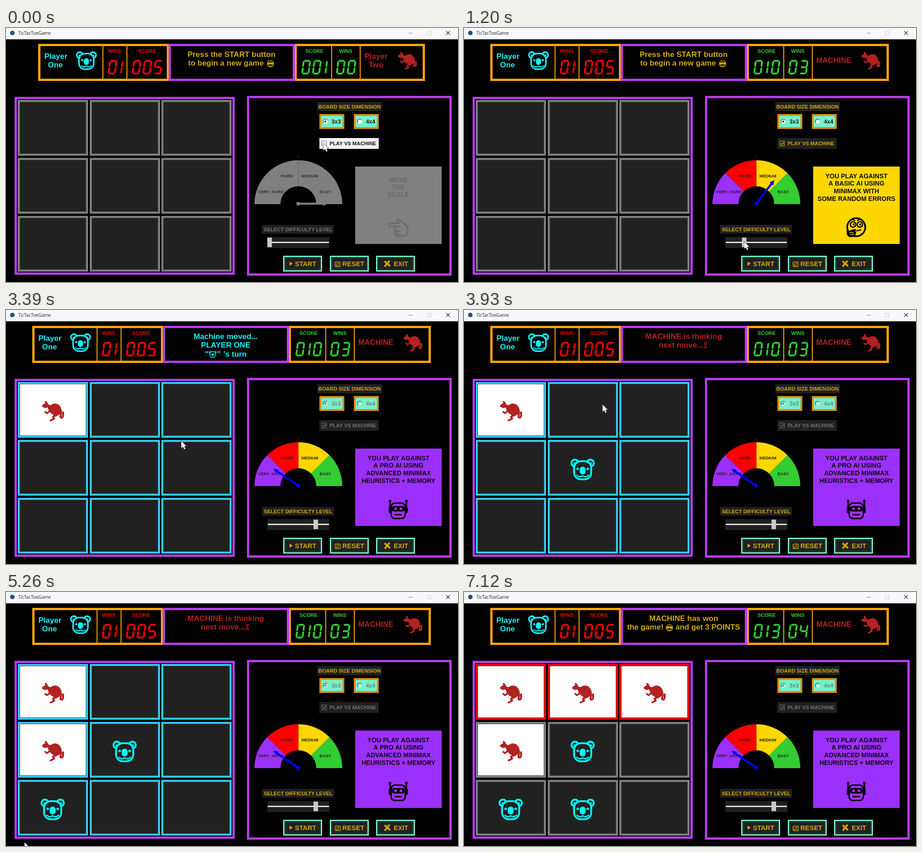
Animation of 998 by 561 pixels, one loop 7.19 s. Source, as an HTML page with a canvas:

```html
<!DOCTYPE html>
<html lang="en">
<head>
<meta charset="utf-8">
<title>TicTacToeGame</title>
<style>
  html, body { margin: 0; width: 100%; height: 100%; overflow: hidden; background: #000; }
  canvas { display: block; }
</style>
</head>
<body>
<canvas id="stage" width="998" height="561"></canvas>
<script>
const ctx = document.getElementById('stage').getContext('2d');
const LOOP = 7190;
const GOLD = '#cfa90f', DARK = '#212121', GRAY = '#808080', PURPLE = '#b93cf5', ORANGE = '#ffa500';
const CYAN = '#12f2fa', BRICK = '#b22222', LIME = '#32cd32', MINT = '#78efc8';

// time, x, y of the pointer
const POINTER = [
  [0, 701, 255], [130, 701, 255], [530, 583, 472], [590, 583, 472], [725, 597, 473],
  [855, 606, 473], [990, 608, 473], [1195, 618.5, 472], [1660, 645, 467], [2190, 676, 444],
  [2390, 684, 443], [2590, 684, 443], [2655, 672, 485], [2725, 657, 518], [3125, 657, 518],
  [3391, 388, 289], [3458, 272, 348], [3725, 272, 348], [3920, 306, 209], [4454, 306, 209],
  [4455, 62, 500], [5055, 62, 500], [5250, 41, 553], [6114, 41, 553],
  [6115, 255, 500], [6310, 255, 575], [LOOP, 255, 575]
];
// time, column, row, piece
const MOVES = [
  [3260, 0, 0, 'roo'], [3730, 1, 1, 'koala'], [4460, 0, 1, 'roo'], [5060, 0, 2, 'koala'],
  [5720, 2, 0, 'roo'], [6120, 1, 2, 'koala'], [6850, 1, 0, 'roo']
];
const LEVELS = [
  ['EASY', LIME, 705, 362, ['YOU PLAY AGAINST', 'A SIMPLE AI USING', 'RANDOM MOVES', 'WITHOUT STRATEGY']],
  ['MEDIUM', '#ffd700', 671, 327, ['YOU PLAY AGAINST', 'A BASIC AI USING', 'MINIMAX WITH', 'SOME RANDOM ERRORS']],
  ['HARD', '#ff0000', 620, 327, ['YOU PLAY AGAINST', 'A LOGICAL AI USING', 'MINIMAX + PRUNING', 'NO HEURISTIC BOOSTS']],
  ['VERY_HARD', '#9b30ff', 585, 362, ['YOU PLAY AGAINST', 'A PRO AI USING', 'ADVANCED MINIMAX', 'HEURISTICS + MEMORY']]
];

function rect(x, y, w, h, color) { ctx.fillStyle = color; ctx.fillRect(x, y, w, h); }
function frame(x, y, w, h, border, color, fill = '#000') {
  rect(x, y, w, h, color);
  rect(x + border, y + border, w - 2 * border, h - 2 * border, fill);
}
function text(s, x, y, size, color, align = 'center') {
  ctx.font = `bold ${size}px "Liberation Sans", Arial, sans-serif`;
  ctx.textAlign = align;
  ctx.fillStyle = color;
  ctx.fillText(s, x, y + size * 0.36);
}
function at(x, y, scale, draw) {
  ctx.save();
  ctx.translate(x, y);
  ctx.scale(scale, scale);
  ctx.lineCap = ctx.lineJoin = 'round';
  draw();
  ctx.restore();
}
function dot(x, y, r, color) {
  ctx.fillStyle = color;
  ctx.beginPath(); ctx.arc(x, y, r, 0, 7); ctx.fill();
}
function ring(x, y, r, width, color) {
  ctx.strokeStyle = color; ctx.lineWidth = width;
  ctx.beginPath(); ctx.arc(x, y, r, 0, 7); ctx.stroke();
}
function pill(x, y, w, h, r, color) {
  ctx.fillStyle = color;
  ctx.beginPath(); ctx.roundRect(x, y, w, h, r); ctx.fill();
}
function line(d, width, color) {
  ctx.strokeStyle = color; ctx.lineWidth = width;
  ctx.stroke(new Path2D(d));
}
function shape(d, color) { ctx.fillStyle = color; ctx.fill(new Path2D(d)); }

function koala(x, y, scale, bg, color = '#00f5ff') {
  at(x, y, scale, () => {
    for (const s of [-1, 1]) { dot(17 * s, -14, 9.7, color); dot(17 * s, -14, 5.6, bg); }
    pill(-21, -20, 42, 44, 17, color);
    pill(-17, -16, 34, 36, 13, bg);
    for (const s of [-1, 1]) { dot(18 * s, -13, 2.5, color); dot(11 * s, -1, 2.8, color); }
    pill(-6.5, -6, 13, 17, 6, color);
    line('M-13 13Q-7 19 0 14Q7 19 13 13', 2.6, color);
  });
}
function roo(x, y, scale) {
  at(x, y, scale, () => {
    shape('M-24.5-11Q-21-16-17-17L-18-22Q-13-23-11-16Q-8-11-3-14C5-20 17-15 19-3Q19 5 13 9' +
      'L5 13L0 8Q-6 5-9-1L-12-8Q-18-4-24.5-11Z', BRICK);
    line('M17-2C21 8 13 14 19 14.5Q23.5 15 22.5 3', 4.2, BRICK);
    line('M-7 0L-13 5L-17 2', 3.6, BRICK);
    line('M8 8L0 13L3 17L-5 21', 4, BRICK);
  });
}
function coolFace(x, y, color) {
  at(x, y, 1, () => {
    ring(0, 0, 7, 1.6, color);
    shape('M-7-2Q0-5 7-2Q6 3 2 2L0 0L-2 2Q-6 3-7-2Z', color);
    line('M-3 4Q0 6 3 4', 1.3, color);
  });
}

const SEGMENTS = { 0: 'abcdef', 1: 'bc', 3: 'abcdg', 4: 'bcfg', 5: 'acdfg' };
const BARS = {
  a: [2, 2, 16, 2], b: [16, 2, 16, 16], c: [16, 16, 16, 30], d: [2, 30, 16, 30],
  e: [2, 16, 2, 30], f: [2, 2, 2, 16], g: [2, 16, 16, 16]
};
function led(digits, x, color) {
  ctx.fillStyle = color;
  for (const d of digits) {
    ctx.save();
    ctx.transform(1, 0, -0.13, 1, x + 4.2 - (d === '1' ? 10 : 0), 70.5);
    for (const key of SEGMENTS[d]) {
      const [x1, y1, x2, y2] = BARS[key];
      const ux = Math.sign(x2 - x1), uy = Math.sign(y2 - y1), h = 2;
      const p = (px, py, along, side) => ctx.lineTo(px + ux * along - uy * side, py + uy * along + ux * side);
      ctx.beginPath();
      p(x1, y1, .3, 0); p(x1, y1, 2, h); p(x2, y2, -2, h);
      p(x2, y2, -.3, 0); p(x2, y2, -2, -h); p(x1, y1, 2, -h);
      ctx.fill();
    }
    ctx.restore();
    x += d === '1' ? 14.5 : 23.7;
  }
}

function titleBar() {
  rect(0, 0, 998, 25, '#f7f8fc');
  dot(14, 11, 5, '#24507c');
  ctx.font = '10px "Open Sans", sans-serif';
  ctx.textAlign = 'left';
  ctx.fillStyle = '#222';
  ctx.fillText('TicTacToeGame', 27, 15);
  rect(889, 11, 9, 1, '#777');
  ctx.strokeStyle = '#ccc'; ctx.lineWidth = 1;
  ctx.strokeRect(930.5, 7.5, 8, 8);
  line('M972 7L980 15M980 7L972 15', 1.1, '#222');
}

function message(t) {
  const x = t < 70 ? 498 : 485;
  if (t < 3130) {
    text('Press the START button', x, 57.5, 17, GOLD);
    text('to begin a new game', x - 96, 77, 17, GOLD, 'left');
    coolFace(x + 86, 79, GOLD);
  } else if (t >= 6850) {
    text('MACHINE has won', x, 57.5, 17, GOLD);
    text('the game!', 360, 77, 17, GOLD, 'left');
    coolFace(453.5, 79, GOLD);
    text('and get 3 POINTS', 467, 77, 17, GOLD, 'left');
  } else {
    const last = MOVES.filter(m => m[0] <= t).pop();
    if (last && last[3] === 'roo') {
      text('Machine moved...', x, 57.5, 17, CYAN);
      text('PLAYER ONE', x, 77, 17, CYAN);
      text('"', 439, 96.5, 17, CYAN, 'left');
      koala(456.5, 98, 0.32, '#000', CYAN);
      text('"', 466, 96.5, 17, CYAN, 'left');
      text("'s turn", 480, 96.5, 17, CYAN, 'left');
    } else {
      text('MACHINE is thinking', x, 57.5, 17, BRICK);
      text('next move...', 430, 77, 17, BRICK, 'left');
      line('M529.5 72H536.5M529.5 83H536.5M530.5 72Q531 76 533 77.5Q535 76 535.5 72M530.5 83Q531 79 533 77.5Q535 79 535.5 83', 1.3, BRICK);
    }
  }
}

function header(t) {
  const versus = t >= 70, dx = versus ? 0 : 13, won = t >= 6850;
  frame(58 + dx, 35, 289, 82, 5, ORANGE);
  frame(624 + dx, 35, versus ? 314 : 288, 82, 5, ORANGE);
  frame(346 + dx, 35, 279, 82, 5, PURPLE);
  for (const x of [200, 253, 705, 768]) rect(x + dx, 40, 2, 72, ORANGE);
  text('Player', 97 + dx, 61.5, 17, CYAN);
  text('One', 96 + dx, 81, 17, CYAN);
  koala(164.5 + dx, 72, 0.86, '#000', CYAN);
  text('WINS', 227 + dx, 51, 11.4, '#f00000');
  text('SCORE', 298.5 + dx, 51, 11.2, '#f00000');
  led('01', 211 + dx, '#ff0000');
  led('005', 264 + dx, '#ff0000');
  text('SCORE', 668 + dx, 51, 11.2, LIME);
  text('WINS', 737 + dx, 51, 11.4, LIME);
  led(won ? '013' : versus ? '010' : '001', 638.5 + dx, LIME);
  led(won ? '04' : versus ? '03' : '00', 715 + dx, LIME);
  if (versus) text('MACHINE', 816.5, 71, 16.6, BRICK);
  else { text('Player', 817, 61.5, 17, BRICK); text('Two', 817, 81, 17, BRICK); }
  roo(versus ? 898 : 886, 72, 0.86);
  message(t);
}

function board(t) {
  frame(19, 152, 486, 393, 5, PURPLE);
  const won = t >= 6850, taken = MOVES.filter(m => m[0] <= t);
  for (let row = 0; row < 3; row++) for (let col = 0; col < 3; col++) {
    const x = Math.round(26 + col * 158.6), y = 159 + row * 128;
    const move = taken.find(m => m[1] === col && m[2] === row), piece = move && move[3];
    const edge = t < 3130 ? GRAY : !won ? '#35cbf5' : row === 0 ? '#ff0000' : GRAY;
    frame(x, y, 155, 123, 4, edge);
    rect(x + 4, y + 4, 147, 115, '#4a4a4a');
    const bg = piece === 'roo' ? '#fff' : DARK;
    rect(x + 5, y + 5, 145, 113, bg);
    if (piece === 'roo') roo(x + 77.5, y + 64, 1);
    if (piece === 'koala') koala(x + 77, y + 65, 1, bg, '#00ffff');
  }
}

function options(t) {
  const locked = t >= 3130, hover = t < 200;
  rect(687, 164, 143, 20, DARK);
  text('BOARD SIZE DIMENSION', 758.5, 174, 11.35, GOLD);
  [['3x3', 692], ['4x4', 768]].forEach(([label, x], i) => {
    frame(x, 190, 55, 33, 4, '#d68f08', MINT);
    dot(x + 13, 206.5, 5, locked ? '#b8f5e0' : '#fff');
    ctx.strokeStyle = '#333'; ctx.lineWidth = 1.2;
    ctx.beginPath(); ctx.arc(x + 13, 206.5, 5, 2.4, 5.6); ctx.stroke();
    if (!i) dot(x + 13, 206.5, 2, locked ? '#666' : '#111');
    text(label, x + 37, 206.5, 12.2, locked ? '#6d867d' : '#1c1c1c');
  });
  rect(692, 243, 131, 24, hover ? '#f2f2f2' : DARK);
  const color = locked ? '#717171' : hover ? '#111' : GOLD;
  ctx.strokeStyle = hover ? '#777' : color; ctx.lineWidth = 1;
  ctx.strokeRect(697.5, 249.5, 10, 11);
  if (t >= 70) line('M700 255L702 257.5L706 252', 1.8, color);
  text('PLAY VS MACHINE', 766, 255, 11.3, color);
}

function gauge(angle, enabled) {
  LEVELS.forEach(([label, color, x, y], i) => {
    ctx.fillStyle = enabled ? color : GRAY;
    ctx.beginPath();
    ctx.arc(645.5, 389, 97, -i * Math.PI / 4, -(i + 1) * Math.PI / 4, true);
    ctx.arc(645.5, 389, 39.5, -(i + 1) * Math.PI / 4, -i * Math.PI / 4);
    ctx.fill();
  });
  for (const [label, , x, y] of LEVELS) text(label, x, y, 9.2, enabled ? '#29221a' : '#333');
  rect(645, 284, 1, 2, '#888');
  const color = enabled ? '#0000ff' : GRAY;
  ctx.save();
  ctx.translate(645, 388);
  ctx.rotate(-angle);
  dot(0, 0, 4, color);
  rect(0, -2.2, 57, 4.4, color);
  shape('M66 0L54-5.5L57 0L54 5.5Z', color);
  ctx.restore();
}

const ICONS = [
  () => { ring(0, 0, 20, 3.6, '#000'); dot(-7, -5, 3, '#000'); dot(7, -5, 3, '#000'); line('M-10 6Q0 17 10 6', 3, '#000'); },
  bg => {
    ring(0, 0, 20, 3.6, '#000');
    ring(-7, -6, 6, 2.6, '#000'); ring(8, -6, 6, 2.6, '#000');
    dot(-6, -6, 2.2, '#000'); dot(9, -6, 2.2, '#000');
    line('M-13-15Q-8-18-3-15M3-15Q9-19 14-15M1 8L10 6', 2.4, '#000');
    shape('M-21 5Q-18 2-16 8L-4 4Q2 4-2 9Q1 12-1 15Q-2 21-11 22Q-21 22-21 12Z', '#000');
    line('M-15 12H-6M-13 16H-5', 1.3, bg);
  },
  bg => {
    ring(0, 0, 20, 3.6, '#000');
    ring(-8, -3, 4.5, 2.4, '#000'); ring(8, -3, 4.5, 2.4, '#000');
    dot(-8, -3, 1.7, '#000'); dot(8, -3, 1.7, '#000');
    line('M-14-9L-6-13M14-9L6-13', 2.6, '#000');
    shape('M-9 14Q-9 5 0 5Q9 5 9 14Q0 10-9 14Z', '#000');
  },
  bg => {
    line('M-18-5V-17M18-5V-17', 3, '#000');
    dot(-18, -18, 3, '#000'); dot(18, -18, 3, '#000');
    pill(-21, -6, 42, 15, 4, '#000');
    pill(-17, -15, 34, 37, 9, '#000');
    pill(-14, -12, 28, 31, 7, bg);
    pill(-14, -7, 28, 12, 5, '#000');
    pill(-9, -4, 6, 6, 2, bg); pill(3, -4, 6, 6, 2, bg);
    line('M-7 12H7', 3, '#000');
  }
];
function info(level, enabled) {
  const [, color, , , lines] = LEVELS[level];
  const bg = enabled ? color : GRAY;
  rect(771, 306, 191, 171, bg);
  if (enabled) {
    lines.forEach((s, i) => text(s, 866.5, 326.5 + i * 16.7, 14, '#0c0c0c'));
    at(866, 440, 1, () => ICONS[level](bg));
  } else {
    ['MOVE', 'THE', 'SCALE'].forEach((s, i) => text(s, 866, 334.5 + i * 16.7, 14, '#6a6a6a'));
    at(866, 441, 1, () => line('M-18-10H2L-2-15Q0-20 5-16L13-8Q20-6 21 0V9Q19 19 9 19H0Q-6 19-5 14' +
      'Q-9 12-6 8Q-10 5-7 1H-4M-7-3H-18Q-23-6-18-10M-7-3H3M-5 8H4M-4 14H4', 3, '#6a6a6a'));
  }
}

function slider(x, enabled) {
  rect(565, 435, 159, 19, DARK);
  text('SELECT DIFFICULTY LEVEL', 645, 444.5, 11.25, enabled ? GOLD : '#757575');
  rect(577, 462, 137, 24, DARK);
  rect(578, 472, 135, 3, '#dedede');
  rect(x - 5, 463, 10, 21, '#c9c9c9');
}

function buttons(pressed) {
  [['START', 612, 49.5], ['RESET', 715, 52], ['EXIT', 817, 55]].forEach(([label, x, cx], i) => {
    const down = !i && pressed, color = down ? '#000' : GOLD;
    frame(x, 503, 86, 35, 3, MINT);
    frame(x + 4, 507, 78, 27, 1, '#555', down ? '#f0f0f0' : DARK);
    text(label, x + cx, 520.5, 14.5, color);
    if (i === 0) shape('M626 516L633 520.5L626 525Z', color);
    if (i === 1) {
      line('M727 517H736Q738 517 738 519V527H728Q726.5 527 726.5 525V517', 1.4, color);
      line('M729 521H735L733 519M735 524H729L731 526', 1.2, color);
    }
    if (i === 2) line('M836 515L848 526M847 514L836 527', 3.8, color);
  });
}

function pointerAt(t) {
  const step = Math.floor((t + 8) / 66.6) * 66.5;
  const i = Math.max(1, POINTER.findIndex(k => k[0] > step));
  const [t0, x0, y0] = POINTER[i - 1], [t1, x1, y1] = POINTER[i];
  const f = (step - t0) / (t1 - t0);
  return [x0 + (x1 - x0) * f, y0 + (y1 - y0) * f];
}
function drawPointer(x, y) {
  at(x, y, 1, () => {
    const d = 'M0 0V15.5L3.6 12.2L6.2 18L8.8 16.8L6.3 11.2H11Z';
    line(d, 1, '#222');
    shape(d, '#fff');
  });
}

function render(t) {
  const [px, py] = pointerAt(t);
  const knob = t < 590 ? 582 : t < 2400 ? Math.min(px, 684) : 684;
  const angle = Math.PI * (knob - 582) / 126;
  const enabled = t >= 70;
  rect(0, 0, 998, 561, '#000');
  titleBar();
  header(t);
  board(t);
  frame(532, 150, 452, 397, 5, PURPLE);
  options(t);
  gauge(angle, enabled);
  info(Math.min(3, Math.floor(angle / (Math.PI / 4))), enabled);
  slider(knob, enabled);
  buttons(t >= 2870 && t < 2930);
  drawPointer(px, py);
}

const start = performance.now();
function tick() {
  render((performance.now() - start) % LOOP);
  requestAnimationFrame(tick);
}
tick();
</script>
</body>
</html>
```
